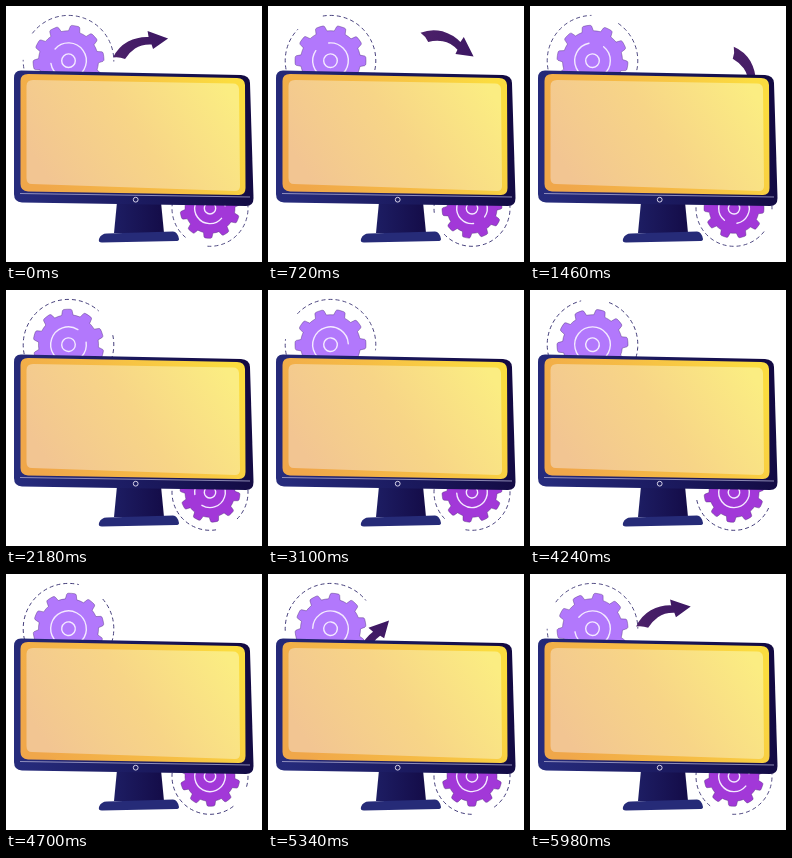
Write an HTML page that moves like this. It is 256x256 px and loops after 6000 ms.

```html
<!DOCTYPE html>
<html lang="en">
<head>
<meta charset="utf-8">
<title>Monitor with gears</title>
<style>
  html, body { margin: 0; width: 100%; height: 100%; overflow: hidden; background: #fff; }
  svg { display: block; width: 100vw; height: 100vh; }
</style>
</head>
<body>
<svg viewBox="0 0 256 256">
  <defs>
    <linearGradient id="plum" gradientUnits="userSpaceOnUse" x1="108" y1="50" x2="162" y2="32">
      <stop offset="0" stop-color="#4c2169"/><stop offset="1" stop-color="#3c1763"/>
    </linearGradient>
    <linearGradient id="case" x1="0" y1="0.6" x2="1" y2="0.5">
      <stop offset="0" stop-color="#262b7c"/><stop offset="0.5" stop-color="#1b1a5f"/><stop offset="1" stop-color="#130a42"/>
    </linearGradient>
    <linearGradient id="neck" x1="0" y1="0" x2="1" y2="0">
      <stop offset="0" stop-color="#1d1d63"/><stop offset="1" stop-color="#140c48"/>
    </linearGradient>
    <linearGradient id="rim" x1="0" y1="0.6" x2="1" y2="0.3">
      <stop offset="0" stop-color="#f0a74a"/><stop offset="0.5" stop-color="#f6bd45"/><stop offset="1" stop-color="#fbdc3f"/>
    </linearGradient>
    <linearGradient id="glow" x1="0" y1="0.6" x2="1" y2="0.25">
      <stop offset="0" stop-color="#f2c592"/><stop offset="0.5" stop-color="#f7d587"/><stop offset="1" stop-color="#fbed82"/>
    </linearGradient>
  </defs>
  <rect width="256" height="256" fill="#fff"/>

  <g id="gears"></g>

  <path id="arrow" fill="url(#plum)"
    d="M107 51.500Q112 41 122 35.500Q132 30.500 142.500 31L141.500 25L162 32.500L147 43L145.500 38.500Q136 38 129 42.500Q123 46.500 119 53Q113 50.500 107 51.500Z"/>

  <path fill="url(#neck)" d="M111 196H155L158 227H108Z"/>
  <path fill="#262b78" d="M101 227.500L167 225.500Q171.500 225.500 173 233Q173 235 170 235L96 236.500Q92 236.500 93 233Q95 227.500 101 227.500Z"/>
  <path fill="url(#case)"
    d="M15 64.500L235 69Q243.500 69.500 244 77L247.500 192Q247.500 200 240 200L16 196.500Q8 196 8 188V72Q8 64.500 15 64.500Z"/>
  <path fill="url(#rim)"
    d="M22 68L231 72Q238.500 72 239 79L239.500 182Q239.500 189 233 189L22 185.500Q14.500 185 14.500 178V75Q14.500 68 22 68Z"/>
  <path fill="url(#glow)"
    d="M27 74L227 77.500Q232.500 77.500 233 83L234 180Q234 185 229 185L26 178Q20.500 178 20.500 172V80Q20.500 74 27 74Z"/>
  <path d="M14 187.500L244 191" stroke="#aaa8cf" stroke-width=".8"/>
  <circle cx="129.700" cy="193.700" r="2.400" fill="none" stroke="#d5d1e8" stroke-width="1"/>
</svg>
<script>
const LOOP = 6000;
const TEETH = 10;
const PIVOT = [161, 96.5];

const point = (r, deg) => {
  const a = deg * Math.PI / 180;
  return `${(r * Math.cos(a)).toFixed(2)} ${(r * Math.sin(a)).toFixed(2)}`;
};

function gearPath(outer, root, phase) {
  let d = "";
  for (let i = 0; i < TEETH; i++) {
    const a = phase + i * 360 / TEETH;
    d += `${i ? "L" : "M"}${point(root, a - 11)}L${point(outer - 1, a - 8)}` +
      `Q${point(outer, a - 7)} ${point(outer, a - 5)}` +
      `A${outer} ${outer} 0 0 1 ${point(outer, a + 5)}` +
      `Q${point(outer, a + 7)} ${point(outer - 1, a + 8)}L${point(root, a + 11)}` +
      `A${root} ${root} 0 0 1 ${point(root, a + 25)}`;
  }
  return d + "Z";
}

// Clockwise arc between two angles in degrees.
const arc = (r, from, to) =>
  `M${point(r, from)}A${r} ${r} 0 ${to - from > 180 ? 1 : 0} 1 ${point(r, to)}`;

const gears = [
  { x: 62.5, y: 54.7, outer: 35.5, root: 30, ring: 17.8, hub: 6.8, orbit: 45.3,
    phase: 29, ringGap: 196, orbitGap: 19, fill: "#b278fc" },
  { x: 204, y: 202.3, outer: 30, root: 25, ring: 15.3, hub: 5.7, orbit: 38,
    phase: 22, ringGap: 16, orbitGap: 112, fill: "#a238d8" }
];

document.getElementById("gears").innerHTML = gears.map(g => `
  <g transform="translate(${g.x} ${g.y})"><g class="spin" fill="none">
    <path d="${arc(g.orbit, g.orbitGap + 18, g.orbitGap + 162)}${arc(g.orbit, g.orbitGap + 198, g.orbitGap + 342)}"
      stroke="#403a78" stroke-width=".9" stroke-dasharray="4 3"/>
    <path d="${gearPath(g.outer, g.root, g.phase)}" fill="${g.fill}" stroke="#4b2a78" stroke-width=".4"/>
    <g stroke="#f4eaff" stroke-width="1.4" stroke-linecap="round">
      <path d="${arc(g.ring, g.ringGap + 25, g.ringGap + 335)}"/>
      <circle r="${g.hub}"/>
    </g>
  </g></g>`).join("");

const spinners = document.querySelectorAll(".spin");
const arrow = document.getElementById("arrow");

function draw(time) {
  const angle = (time % LOOP) / LOOP * 360;
  spinners.forEach(el => el.setAttribute("transform", `rotate(${angle})`));
  arrow.setAttribute("transform", `rotate(${angle} ${PIVOT})`);
}

const start = performance.now();
function tick() {
  draw(performance.now() - start);
  requestAnimationFrame(tick);
}
draw(0);
requestAnimationFrame(tick);
</script>
</body>
</html>
```
